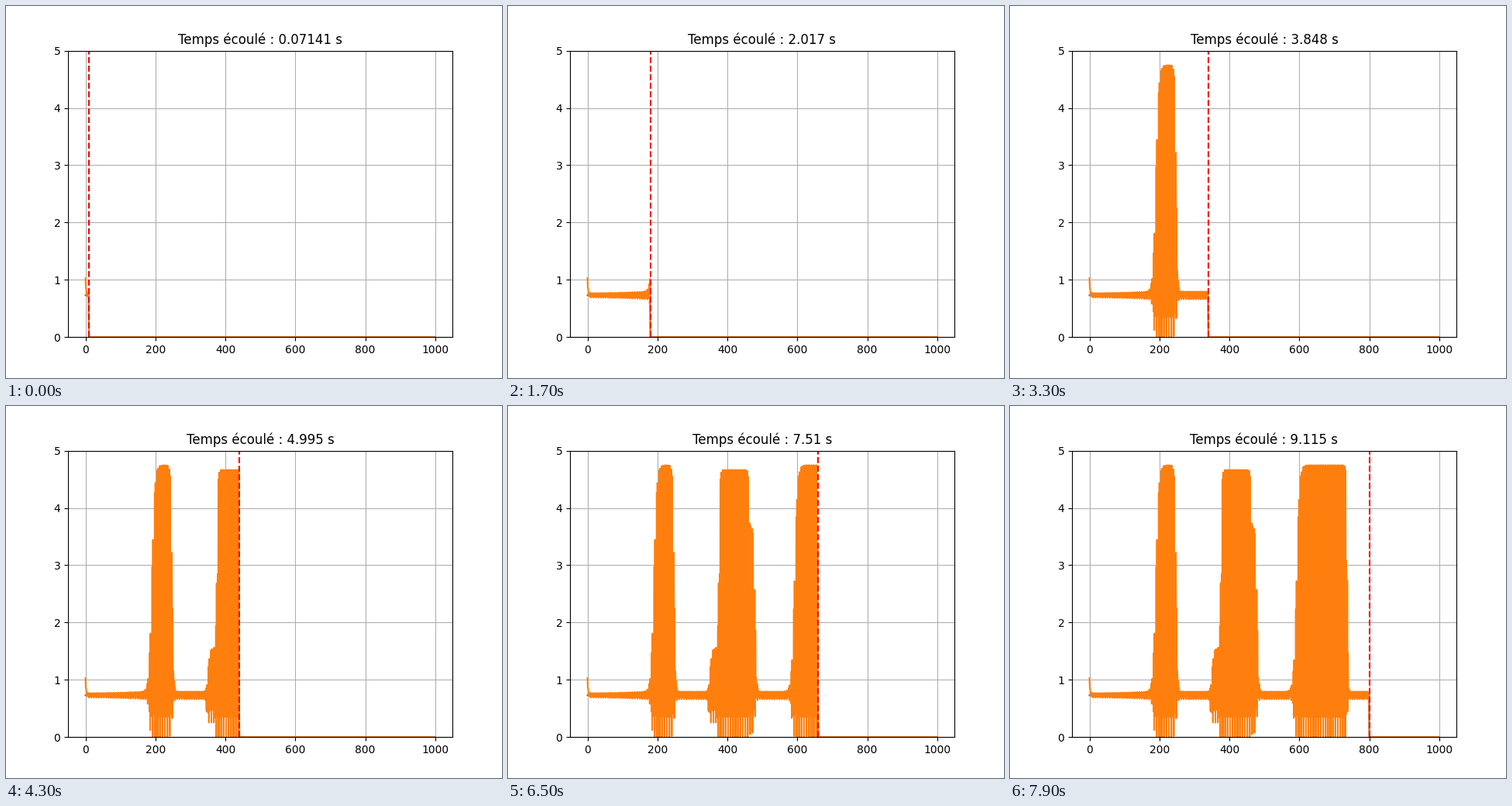
These frames come from a looping animation (640x480 px, 8000 ms). A matplotlib script:

```python
import numpy as np
import matplotlib.pyplot as plt
from matplotlib.animation import FuncAnimation

N = 1000
STEP = 10
FRAMES = 80
REST = 0.73
PEAK = 4.0

# Bursts: on, rise, off, fall (samples), height
BURSTS = [
    (190, 4, 248, 2, PEAK),
    (351, 2.5, 377, 1.5, 0.2 * PEAK),
    (376, 1.5, 479, 2, 0.74 * PEAK),
    (376, 1.5, 461, 1, 0.24 * PEAK),
    (592, 4, 737, 1.3, PEAK),
]


def step(i, center, width):
    return 0.5 + 0.5 * np.tanh((i - center) / (2 * width))


def make_signal():
    """A ripple with a period of 7/3 samples that swells in bursts."""
    i = np.arange(N)
    swell, dip = np.zeros(N), np.zeros(N)
    for on, rise, off, fall, height in BURSTS:
        end = 1 - step(i, off, fall)
        swell += height * step(i, on, rise) * end
        # the trough opens a little before the crest
        dip += (height / PEAK) ** 0.3 * step(i, on - 2 * rise, rise / 2) * end

    ripple = 0.04 + 0.03 * np.clip(i / 175, 0, 1) ** 2
    high = REST + ripple + swell
    low = (REST - ripple) * (1 - np.minimum(dip, 1))
    sharp = 0.3 + 1.5 * np.minimum(swell / PEAK, 1)
    wave = np.tanh(-sharp * np.cos(6 * np.pi / 7 * (i - 3))) / np.tanh(sharp)
    return low + (high - low) * (1 + wave) / 2 + 0.29 * np.exp(-i / 1.5)


def elapsed(k):
    return np.interp(k, [0, 17, 33, 43, 56, 65, 79],
                     [.07141, 2.017, 3.848, 4.995, 6.482, 7.51, 9.115])


xs = np.arange(N)
signal = make_signal()

fig, ax = plt.subplots(figsize=(6.4, 4.8), dpi=100)
level_line, = ax.plot(xs, np.zeros(N))
signal_line, = ax.plot(xs, np.zeros(N))
cursor = ax.axvline(STEP, color="r", linestyle="--")
ax.set_ylim(0, 5)
ax.grid(True)
title = ax.set_title("")


def draw(k):
    n = STEP * (k + 1)
    known = xs < n
    level_line.set_ydata(np.where(known, REST, 0))
    signal_line.set_ydata(np.where(known, signal, 0))
    cursor.set_xdata([n, n])
    title.set_text(f"Temps écoulé : {elapsed(k):.4g} s")
    return level_line, signal_line, cursor, title


anim = FuncAnimation(fig, draw, frames=FRAMES, interval=100,
                     repeat=True, repeat_delay=0)
plt.show()
```
